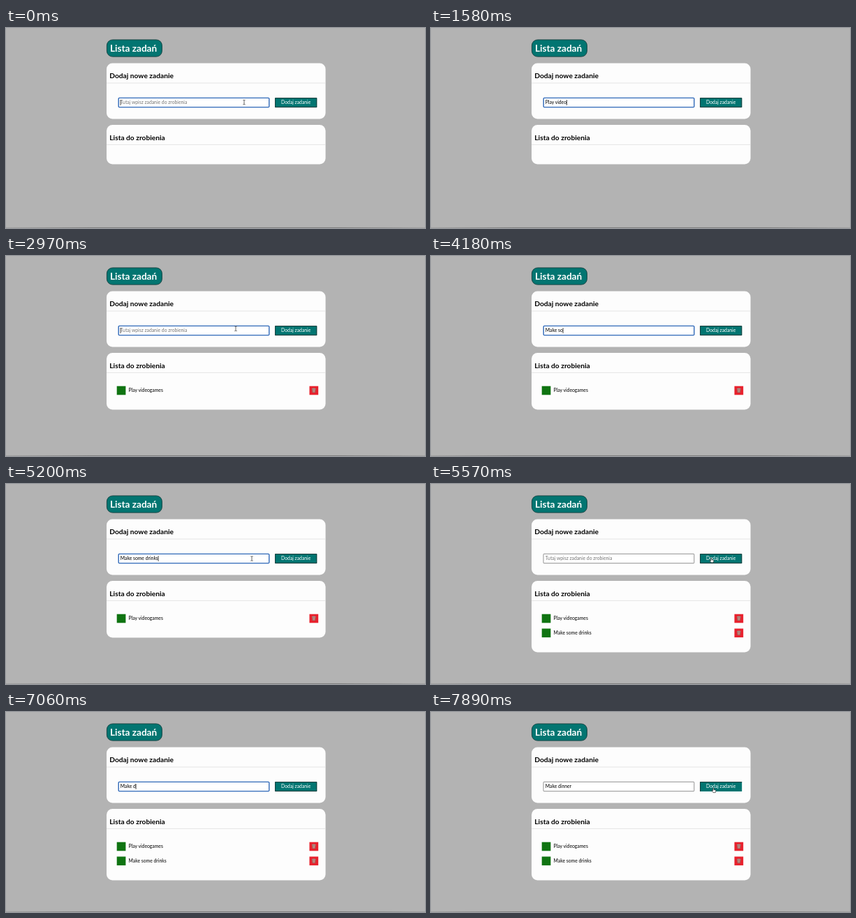
Write an HTML page that moves like this. It is 600x287 px and loops after 7.99 s.

```html
<!DOCTYPE html>
<html lang="pl">
<head>
<meta charset="utf-8">
<title>Lista zadań</title>
<style>
  html, body { margin: 0; width: 100%; height: 100%; overflow: hidden; background: #b3b3b3; }
  svg { display: block; width: 100vw; height: 100vh; }
  text { font: 6.8px Lato, sans-serif; white-space: pre; }
  .h1 { font-size: 13.6px; font-weight: 700; fill: #fff; }
  .h2 { font-size: 10.2px; font-weight: 700; }
  .card { fill: #fdfdfd; }
  .rule { fill: #dedede; }
</style>
</head>
<body>
<svg viewBox="0 0 600 287">
  <defs>
    <linearGradient id="edge">
      <stop offset="0" stop-color="#a2a2a2"/>
      <stop offset=".2" stop-color="#808080"/>
      <stop offset=".8" stop-color="#808080"/>
      <stop offset="1" stop-color="#a2a2a2"/>
    </linearGradient>
    <g id="task">
      <rect x="158.7" y="-6.3" width="12.7" height="12.6" fill="#107412"/>
      <rect x="434.5" y="-6.3" width="12.7" height="12.6" fill="#e8212d"/>
      <path d="M438.3-2.4h5l-.7 5.3h-3.6z" fill="#b27770" stroke="#8f6a62" stroke-width=".5"/>
      <path d="M439.9-1.2l.4 3.2M441.7-1.2l-.4 3.2" stroke="#d7a49c" stroke-width=".4"/>
      <ellipse cx="440.8" cy="-2.5" rx="2.8" ry=".9" fill="#a58a84"/>
    </g>
  </defs>
  <rect width="600" height="287" fill="#b3b3b3"/>
  <rect y="286" width="600" height="1" fill="url(#edge)"/>

  <rect x="144.4" y="16.9" width="79" height="24.2" rx="8.2" fill="#027571" stroke="#123f3e" stroke-width=".9"/>
  <text class="h1" x="149" y="34.2">Lista zadań</text>

  <rect class="card" x="144" y="50.5" width="313.6" height="80" rx="8.5"/>
  <text class="h2" x="148.3" y="72.4">Dodaj nowe zadanie</text>
  <rect class="rule" x="144" y="78.6" width="313.6" height=".8"/>
  <rect id="field"/>
  <text id="entry" x="163.8" y="109.2"></text>
  <rect id="caret" y="103" width=".7" height="8"/>
  <rect x="385.2" y="100.2" width="60" height="13.8" fill="#027571"/>
  <path id="rim" fill="none" stroke="#173534" stroke-width=".9"/>
  <text x="415.2" y="109.2" text-anchor="middle" fill="#fff">Dodaj zadanie</text>

  <rect id="list" class="card" x="144" y="139" width="313.6" rx="8.5"/>
  <text class="h2" x="148.3" y="161">Lista do zrobienia</text>
  <rect class="rule" x="144" y="166.9" width="313.6" height=".8"/>
  <g id="task1"><use href="#task" y="193"/><text x="175.6" y="195.3">Play videogames</text></g>
  <g id="task2"><use href="#task" y="213.8"/><text x="175.6" y="216.1">Make some drinks</text></g>

  <g id="beam" fill="none" stroke="#333" stroke-width=".75">
    <path d="M-1.7-3.4Q0-3.4 0-2.6Q0-3.4 1.7-3.4M0-2.6V2.6M-1.7 3.4Q0 3.4 0 2.6Q0 3.4 1.7 3.4"/>
  </g>
  <path id="arrow" d="M0 0V6.2L1.5 4.9L2.5 7L3.5 6.5L2.6 4.5H4.5Z" stroke="#fff" stroke-width=".5"/>
  <path id="hand" d="M-1.2-3Q-.6-3.7 0-3V-.8L2.4-.3Q3.1 0 2.9 1L2.3 3.3H-1L-2.8.8Q-2.7 0-1.9.3L-1.2.9Z" fill="#fff" stroke="#111" stroke-width=".6"/>
</svg>
<script>
const LOOP = 7990, STEP = 92.9;
const $ = id => document.getElementById(id);
const set = (id, attrs) => { for (const k in attrs) $(id).setAttribute(k, attrs[k]); };
const show = (id, on) => set(id, { visibility: on ? 'visible' : 'hidden' });
const within = (t, spans) => spans.some(([a, b]) => t >= a && t < b);

// Each run types its characters one step apart.
const runs = [
  [560, 'Play v'], [1300, 'ideo'], [1860, 'games'],
  [3435, 'Ma'], [3710, 'ke '], [4085, 'some drinks'],
  [6590, 'Make dinne'], [7610, 'r']
];
const added = [2690, 5570];
const blurred = [[2600, 2970], [5480, 5940], [7890, LOOP]];
const blinkOff = [[90, 460], [3250, 3435], [6220, 6500]];
const pressed = [[2600, 2690], [5480, 5570], [7890, LOOP]];
const pointerHidden = [[560, 2410], [3435, 5200], [6590, 7700]];

// Pointer stops: time, x, y
const stops = [
  [0, 341, 106.6], [90, 341, 107], [370, 341, 107.2],
  [2410, 366, 108], [2505, 395, 109.5], [2600, 403, 110], [2780, 381, 108],
  [2875, 340, 105.5], [2970, 329, 104.2], [3250, 328, 104.5],
  [5200, 352, 107], [5295, 388, 109], [5390, 401, 109.5], [5480, 402, 109.5],
  [5665, 400, 109], [5760, 376, 107.5], [5850, 348, 106.5], [5940, 339, 106.5], [6040, 338, 106.5],
  [7700, 372, 109], [7795, 399, 111], [7890, 405, 112.3]
];

function typedText(t) {
  const from = Math.max(0, ...added.filter(a => t >= a));
  return runs.filter(r => r[0] >= from && r[0] <= t)
    .map(([start, s]) => s.slice(0, Math.floor((t - start + 5) / STEP) + 1)).join('');
}

function drawField(t) {
  const focus = !within(t, blurred), text = typedText(t), entry = $('entry');
  set('field', focus
    ? { x: 161.2, y: 100.4, width: 215.6, height: 13.2, rx: 1, fill: '#fff', stroke: '#2f68b8', 'stroke-width': 1.4 }
    : { x: 161, y: 100.3, width: 215.8, height: 13.4, rx: .8, fill: '#fff', stroke: '#777', 'stroke-width': .8 });
  entry.textContent = text || 'Tutaj wpisz zadanie do zrobienia';
  set('entry', { fill: text ? '#000' : '#757575' });
  set('caret', { x: 163.7 + (text ? entry.getComputedTextLength() : 0) });
  show('caret', focus && !within(t, blinkOff));
}

function drawPointer(t) {
  const [, x, y] = stops.filter(s => s[0] <= t).pop();
  const kind = x > 385 ? 'hand' : x > 377 ? 'arrow' : 'beam';
  for (const id of ['hand', 'arrow', 'beam']) {
    show(id, id === kind && !within(t, pointerHidden));
    set(id, { transform: `translate(${x} ${y})` });
  }
}

function draw(t) {
  const count = added.filter(a => t >= a).length;
  set('list', { height: [56.4, 81.6, 102.4][count] });
  show('task1', count > 0);
  show('task2', count > 1);
  set('rim', { d: within(t, pressed) ? 'M385.6 114V100.6H445.2' : 'M385.6 100.6H444.8V113.6H385.6Z' });
  drawField(t);
  drawPointer(t);
}

const begin = performance.now();
function tick() {
  draw((performance.now() - begin) % LOOP);
  requestAnimationFrame(tick);
}
tick();
</script>
</body>
</html>
```
